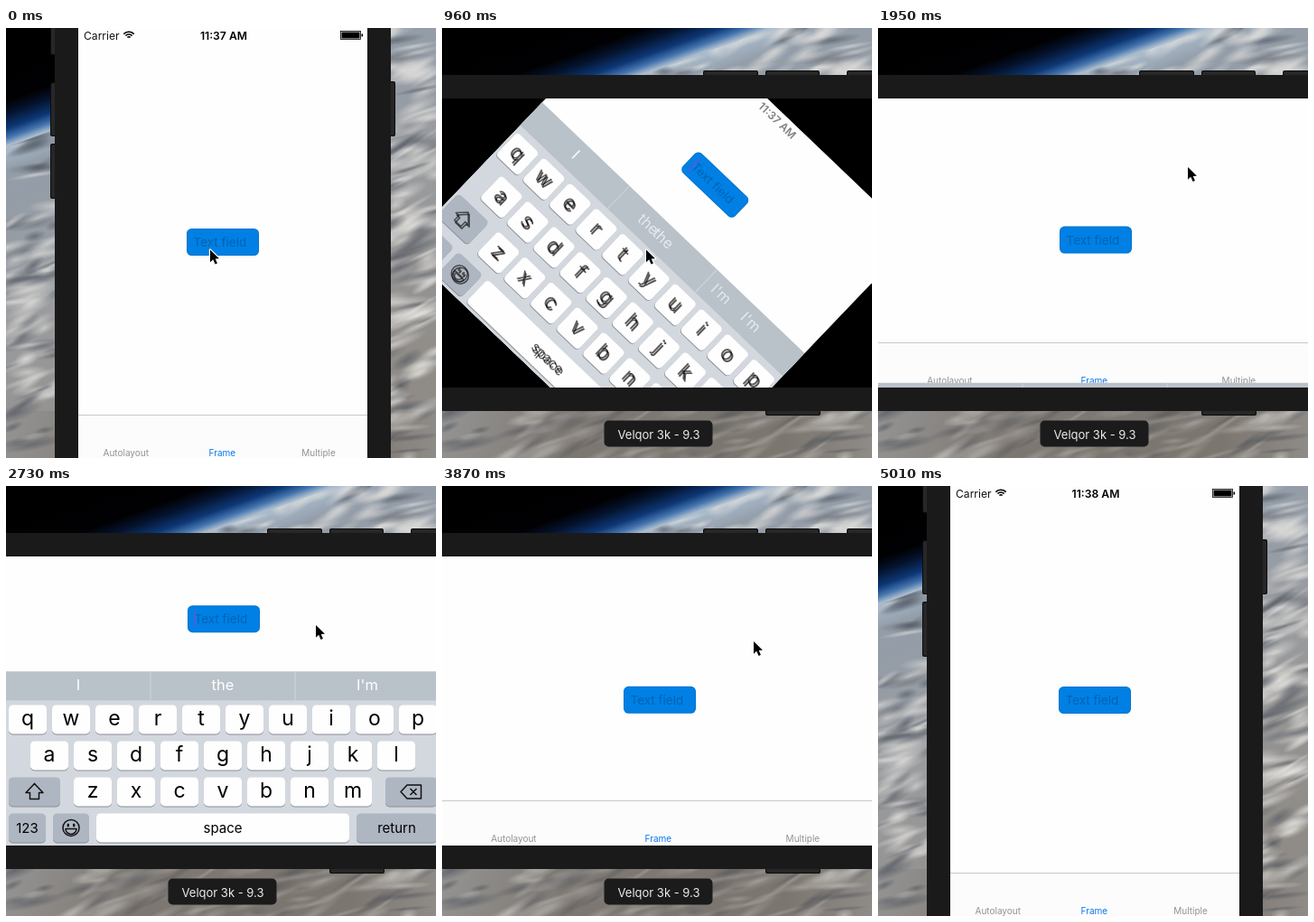
These frames come from a looping animation (476 px wide and 476 px high, 5460 ms). An HTML page with a canvas:

```html
<!DOCTYPE html>
<html lang="en">
<head>
<meta charset="utf-8">
<title>Keyboard and rotation demo</title>
<style>
html, body { margin: 0; width: 100%; height: 100%; overflow: hidden; background: #000; }
canvas { display: block; width: 476px; height: 476px; }
</style>
</head>
<body>
<canvas id="stage"></canvas>
<script>
const SIZE = 476, LOOP = 5460;
const CX = 240, CY = 238;
const FONT = 'Inter, "Open Sans", sans-serif';
const canvas = document.getElementById('stage');
const dpr = window.devicePixelRatio || 1;
canvas.width = canvas.height = SIZE * dpr;
const ctx = canvas.getContext('2d');

// Bursts of steady ticks: start, tick length, last tick
const bursts = [[0, 87.2, 17], [1950, 86.6, 15], [3700, 85, 2], [4140, 85, 4], [4660, 87.4, 4]];

const lerp = (a, b, u) => a + (b - a) * u;
const clamp = u => Math.max(0, Math.min(1, u));
const ease = u => (1 - Math.cos(Math.PI * clamp(u))) / 2;
const spring = ms => {
  const x = Math.max(0, ms) * 0.0183;
  return 1 - (1 + x) * Math.exp(-x);
};

function tickTime(t) {
  const [start, step, last] = bursts.filter(b => b[0] <= t).pop();
  return start + Math.min(last, Math.floor((t - start) / step)) * step;
}

function box(x, y, w, h, r, fill) {
  ctx.beginPath();
  ctx.roundRect(x, y, w, h, r);
  ctx.fillStyle = fill;
  ctx.fill();
}

function text(str, x, y, size, fill, align = 'center', weight = 400) {
  ctx.font = `${weight} ${size}px ${FONT}`;
  ctx.textAlign = align;
  ctx.fillStyle = fill;
  ctx.fillText(str, x, y);
}

function faded(alpha, draw) {
  if (alpha <= 0) return;
  ctx.save();
  ctx.globalAlpha *= Math.min(1, alpha);
  draw();
  ctx.restore();
}

function makeSky() {
  const c = document.createElement('canvas');
  c.width = c.height = SIZE;
  const g = c.getContext('2d');
  const sky = g.createLinearGradient(0, 0, 176, 489);
  [[0, '#000'], [76, '#010103'], [89, '#04122c'], [105, '#0d3775'], [115, '#4474ae'],
   [123, '#aabccd'], [150, '#939da9'], [300, '#9a9c9f'], [520, '#8f8b86']]
    .forEach(([d, col]) => sky.addColorStop(d / 520, col));
  g.fillStyle = sky;
  g.fillRect(0, 0, SIZE, SIZE);

  let seed = 11;
  const rnd = () => (seed = (seed * 16807) % 2147483647) / 2147483647;
  g.beginPath();
  [[0, 132], [366, 0], [SIZE, 0], [SIZE, SIZE], [0, SIZE]].forEach(p => g.lineTo(...p));
  g.clip();
  for (let i = 0; i < 800; i++) {
    const light = rnd() < 0.62;
    g.save();
    g.translate(rnd() * SIZE, rnd() * SIZE);
    g.rotate(-0.65 + rnd() * 0.6);
    g.scale(12 + rnd() * 32, 2.5 + rnd() * 7);
    const puff = g.createRadialGradient(0, 0, 0, 0, 0, 1);
    const rgb = light ? '230,228,224' : '78,84,94';
    puff.addColorStop(0, `rgba(${rgb},0.6)`);
    puff.addColorStop(1, `rgba(${rgb},0)`);
    g.fillStyle = puff;
    g.fillRect(-1, -1, 2, 2);
    g.restore();
  }
  // The lower middle is duskier
  const dusk = g.createLinearGradient(0, 0, SIZE, 0);
  [[0, 0], [0.3, 0.5], [0.8, 0.5], [1, 0]]
    .forEach(([at, a]) => dusk.addColorStop(at, `rgba(104,97,90,${a})`));
  g.fillStyle = dusk;
  g.fillRect(0, 424, SIZE, 52);
  return c;
}
const sky = makeSky();

function phoneBody(land) {
  ctx.save();
  ctx.translate(CX, CY);
  if (land) ctx.rotate(Math.PI / 2);
  ctx.translate(-CX, -CY);
  [[49, -30, 60], [49, 60, 60], [49, 128, 61], [422, 59, 61]].forEach(([x, y, h]) => {
    box(x, y, 9, h, 2, '#0b0b0b');
    box(x + 1, y + 1, 7, h - 2, 2, '#272727');
  });
  ctx.fillStyle = '#1a1a1a';
  ctx.fillRect(54, -60, 372, 600);
  ctx.fillStyle = '#000';
  ctx.fillRect(80, -2, 320, 480);
  ctx.restore();
}

function statusBar(w, time) {
  text('Carrier', 6, 14.5, 12.1, '#111', 'left');
  text(time, w / 2 + 1, 14.5, 12.2, '#000', 'center', 600);
  ctx.strokeStyle = '#000';
  ctx.lineWidth = 1.6;
  [2.2, 5, 7.8].forEach(r => {
    ctx.beginPath();
    ctx.arc(56, 14, r, -Math.PI * 0.76, -Math.PI * 0.24);
    ctx.stroke();
  });
  ctx.lineWidth = 0.8;
  ctx.strokeRect(w - 29.5, 5.5, 22, 9);
  ctx.fillStyle = '#000';
  ctx.fillRect(w - 28.5, 6.5, 20, 7);
  ctx.fillRect(w - 6.5, 8.5, 1.6, 3);
}

function tabBar(w, h) {
  ctx.fillStyle = '#fcfcfc';
  ctx.fillRect(0, h - 49, w, 49);
  ctx.fillStyle = '#c8c8c8';
  ctx.fillRect(0, h - 50, w, 1);
  ['Autolayout', 'Frame', 'Multiple'].forEach((name, i) =>
    text(name, w * (i + 0.5) / 3 - 0.6, h - 3.6, 10, i === 1 ? '#0a78ec' : '#929292'));
}

function textField(x, y, caret) {
  box(x - 40, y - 15, 80, 30, 5.5, '#0080e4');
  ctx.beginPath();
  ctx.roundRect(x - 39.5, y - 14.5, 79, 29, 5);
  ctx.lineWidth = 1;
  ctx.strokeStyle = 'rgba(0,0,0,.1)';
  ctx.stroke();
  text('Text field', x - 32.5, y + 5, 13.5, '#0063b4', 'left');
  if (caret) {
    ctx.fillStyle = '#4a5fe0';
    ctx.fillRect(x - 33, y - 9, 2, 18);
  }
}

const icons = {
  shift() {
    ctx.beginPath();
    [[0, -9], [9.5, 1], [5, 1], [5, 8], [-5, 8], [-5, 1], [-9.5, 1]].forEach(p => ctx.lineTo(...p));
    ctx.closePath();
    ctx.stroke();
  },
  erase() {
    ctx.beginPath();
    [[-11.5, 0], [-4.5, -7.5], [11, -7.5], [11, 7.5], [-4.5, 7.5]].forEach(p => ctx.lineTo(...p));
    ctx.closePath();
    ctx.moveTo(-1, -3.5); ctx.lineTo(6, 3.5);
    ctx.moveTo(6, -3.5); ctx.lineTo(-1, 3.5);
    ctx.stroke();
  },
  smile() {
    ctx.beginPath();
    ctx.arc(0, 0, 9, 0, 7);
    ctx.stroke();
    ctx.beginPath();
    ctx.ellipse(-3.2, -3, 1.3, 2, 0, 0, 7);
    ctx.ellipse(3.2, -3, 1.3, 2, 0, 0, 7);
    ctx.fill();
    ctx.beginPath();
    ctx.arc(0, 1, 6, 0, Math.PI);
    ctx.closePath();
    ctx.stroke();
  }
};

function keyFace(label, x, y) {
  if (!icons[label]) {
    const wide = label.length > 1;
    text(label, x, y + (wide ? 5.3 : 7), wide ? 15 : 23, '#000');
    return;
  }
  ctx.save();
  ctx.translate(x, y);
  ctx.strokeStyle = ctx.fillStyle = '#111';
  ctx.lineWidth = 1.5;
  ctx.lineJoin = 'round';
  icons[label]();
  ctx.restore();
}

// Keys as label, row, then x and width upright and sideways
const keys = [];
[['qwertyuiop', 3, 3], ['asdfghjkl', 19, 27], ['zxcvbnm', 51, 75]].forEach(([row, xp, xl], r) =>
  [...row].forEach((ch, i) => keys.push([ch, r, xp + 32 * i, 26, xl + 48 * i, 42])));
keys.push(['shift', 2, 3, 36, 3, 57], ['erase', 2, 281, 36, 420, 57], ['123', 3, 3, 34, 3, 41],
  ['smile', 3, 43, 34, 52, 40], ['space', 3, 83, 154, 100, 280], ['return', 3, 243, 74, 388, 89]);
const grey = ['shift', 'erase', '123', 'smile', 'return'];

function keyboard(w, h, top, k) {
  const bar = lerp(38, 32, k);
  ctx.save();
  ctx.translate(0, top);
  ctx.fillStyle = '#d3d8df';
  ctx.fillRect(0, 0, w, h);
  ctx.fillStyle = '#b9c1c9';
  ctx.fillRect(0, 0, w, bar);
  ctx.fillStyle = '#d0d7dd';
  [1, 2].forEach(i => ctx.fillRect(Math.round(w * i / 3) - 0.5, 0, 1, bar));
  ['I', 'the', "I'm"].forEach((word, i) => {
    const x = w * (i + 0.5) / 3, y = bar / 2 + 4.5;
    faded((1 - k) * 1.3, () => text(word, x - 44 * k * i, y, 16.5, '#fff'));
    faded(k * 1.3, () => text(word, x, y, 16.5, '#fff'));
  });
  const kh = lerp(38, 32, k);
  keys.forEach(([label, row, xp, wp, xl, wl]) => {
    const x = lerp(xp, xl, k), kw = lerp(wp, wl, k);
    const y = lerp(49 + 54 * row, 37 + 40 * row, k);
    box(x, y + 1, kw, kh, 4.5, '#8b9097');
    box(x, y, kw, kh, 4.5, grey.includes(label) ? '#aeb6c1' : '#fefefe');
    const mx = x + kw / 2, my = y + kh / 2;
    faded((1 - k) * 1.3, () => keyFace(label, mx - 2.5 * k, my - k));
    faded(k * 1.3, () => keyFace(label, mx + 2.5 * (1 - k), my + 1 - k));
  });
  ctx.restore();
}

function pointer(t) {
  let x = 225.5, y = 245;
  const go = (tx, ty, u) => { x = lerp(x, tx, u); y = lerp(y, ty, u); };
  const out = clamp((t - 1134) / 348);
  go(342.5, 153.5, 1 - (1 - out) ** 2);
  go(344.5, 171.5, ease((t - 3080) / 165));
  go(420, 482, clamp((t - 4600) / 405) ** 1.5);
  ctx.save();
  ctx.translate(x + 0.5, y + 0.5);
  ctx.scale(0.92, 0.92);
  ctx.beginPath();
  [[0, 0], [0, 15], [3.5, 11.8], [6, 17.5], [8.6, 16.3], [6.2, 10.8], [10.8, 10.6]]
    .forEach(p => ctx.lineTo(...p));
  ctx.closePath();
  ctx.lineJoin = 'round';
  ctx.lineWidth = 2.6;
  ctx.strokeStyle = '#fff';
  ctx.stroke();
  ctx.fillStyle = '#000';
  ctx.fill();
  ctx.restore();
}

function draw(now) {
  const t = tickTime(now);
  const land = t > 781 && t < 4139;
  const k = ease((t - 781) / 350) - ease((t - 4077) / 350);
  const shown = t < 1650 ? spring(t - 60)
    : t < 2270 ? 1 - spring(t - 1650)
    : t < 3400 ? spring(t - 2270) : 1 - spring(t - 3400);
  const caret = [[80, 560], [780, 1300], [2290, 3200]].some(([a, b]) => t > a && t < b);
  const w = lerp(320, 480, k), h = lerp(480, 320, k), kh = lerp(253, 193, k);

  ctx.setTransform(dpr, 0, 0, dpr, 0, 0);
  ctx.drawImage(sky, 0, 0, SIZE, SIZE);
  phoneBody(land);

  ctx.save();
  ctx.beginPath();
  if (land) ctx.rect(0, 78, 480, 320);
  else ctx.rect(80, -2, 320, 480);
  ctx.clip();
  ctx.translate(CX, CY);
  ctx.rotate((land ? 1 - k : -k) * Math.PI / 2);
  ctx.translate(-w / 2, -h / 2);
  ctx.beginPath();
  ctx.rect(0, 0, w, h);
  ctx.clip();
  ctx.fillStyle = '#fefefe';
  ctx.fillRect(0, 0, w, h);
  faded(1 - k, () => statusBar(w, t < 2500 ? '11:37 AM' : '11:38 AM'));
  tabBar(w, h);
  textField(w / 2 + k, h / 2 - 1 - shown * lerp(87, 90, k), caret);
  if (shown > 0.002) keyboard(w, kh, h - kh * shown, k);
  ctx.restore();

  if (land) {
    box(179.5, 434.5, 120, 29, 5, '#1b1b1b');
    text('Velqor 3k - 9.3', 240, 454.5, 13, '#ececec');
  }
  pointer(t);
}

const begin = performance.now();
function loop() {
  draw((performance.now() - begin) % LOOP);
  requestAnimationFrame(loop);
}
loop();
</script>
</body>
</html>
```
